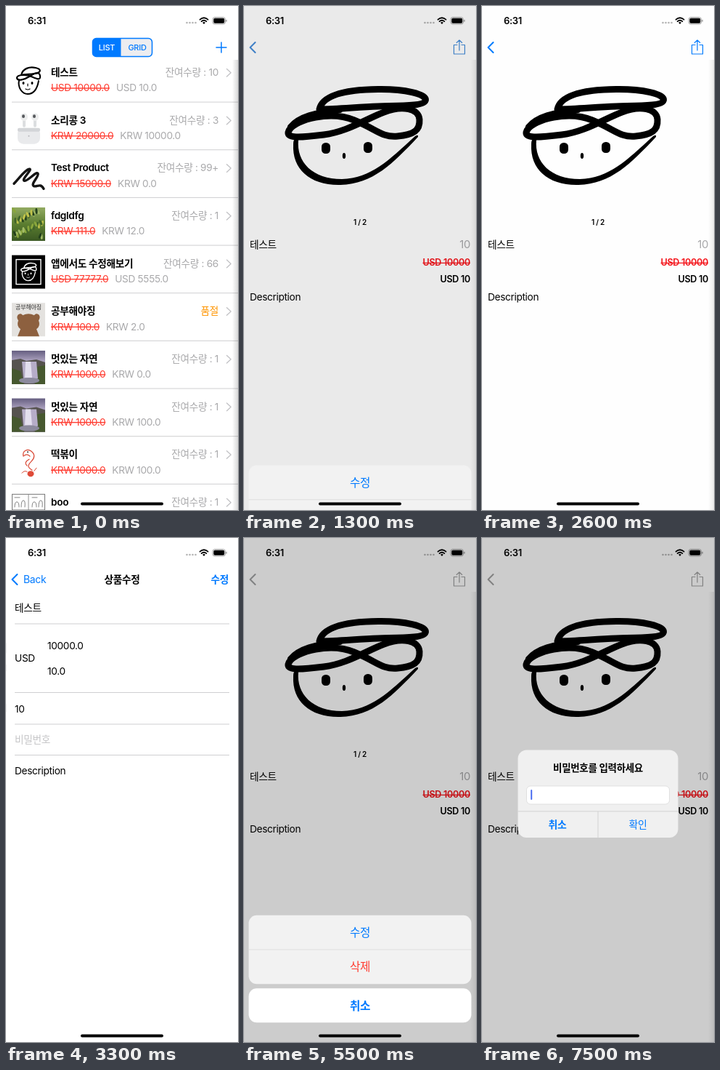
An HTML page for the animation above (8000 ms loop, 320 by 693 pixels).

```html
<!DOCTYPE html>
<html lang="ko">
<head>
<meta charset="utf-8">
<title>Shop app</title>
<style>
  html, body { margin: 0; width: 100%; height: 100%; overflow: hidden; background: #fff; }
  svg { display: block; }
  text { font-family: Inter, 'Noto Sans CJK KR', 'Noto Sans CJK', sans-serif; letter-spacing: -.025em; }
  .line { fill: none; stroke: currentColor; stroke-linecap: round; stroke-linejoin: round; }
</style>
</head>
<body>
<svg id="stage" width="320" height="693" viewBox="0 0 320 693"></svg>
<script>
const BLUE = '#007aff', RED = '#ff3b30', GRAY = '#a9a9ab', RULE = '#cfcfd1';

const text = (x, y, str, { size = 13.7, weight = 400, fill = '#000', anchor = 'start', extra = '' } = {}) =>
  `<text x="${x}" y="${y}" font-size="${size}" font-weight="${weight}" fill="${fill}" text-anchor="${anchor}" ${extra}>${str}</text>`;
const rect = (x, y, w, h, fill, rx = 0, extra = '') =>
  `<rect x="${x}" y="${y}" width="${w}" height="${h}" fill="${fill}" rx="${rx}" ${extra}/>`;
const oval = (cx, cy, rx, ry, fill) => `<ellipse cx="${cx}" cy="${cy}" rx="${rx}" ry="${ry}" fill="${fill}"/>`;
const line = (d, width, color = 'currentColor') =>
  `<path class="line" d="${d}" stroke-width="${width}" style="stroke:${color}"/>`;
const shape = (d, fill) => `<path d="${d}" fill="${fill}"/>`;
const group = (id, body, extra = '') => `<g id="${id}" ${extra}>${body}</g>`;
const gradient = (id, stops, vertical = 1) =>
  `<linearGradient id="${id}" x2="${1 - vertical}" y2="${vertical}">${stops.map(([at, color, alpha = 1]) =>
    `<stop offset="${at}" stop-color="${color}" stop-opacity="${alpha}"/>`).join('')}</linearGradient>`;

// Thumbnails, each in a 46 x 46 box
const face = color => `<g color="${color}">` +
  line('M13 15C15 6 24 3 33 5S40 12 31 13S17 14 13 15', 2.2) +
  line('M7 19C7 14 20 14 27 17S40 23 39 16S30 13 24 17S8 24 7 19', 2.2) +
  line('M10 22C8 32 14 41 22 41S35 34 37 23', 2) +
  oval(16, 26, 1.5, 1.9, color) + oval(28, 26, 1.5, 1.9, color) + line('M22 27v3M19 34q3 2 6 0', 1.2) + '</g>';

const earbuds =
  rect(8, 22, 31, 22, '#e9eaec', 8) + rect(8, 22, 31, 5, '#d3d5d8', 2) + oval(23.5, 33, 1, 1, '#b5b7ba') +
  [13, 28].map(x => rect(x + 2, 6, 4, 15, '#dcdee0', 2) + oval(x + 4, 7, 5, 5.5, '#eceded') +
    oval(x + 3, 6, 2, 2.4, '#55585c')).join('');

let leaves = rect(0, 0, 46, 46, 'url(#leafy)');
for (let i = 0; i < 34; i++) {
  const x = 3 + i * 17 % 40, y = 4 + i * 29 % 37;
  leaves += `<g transform="rotate(${i * 47 % 70 - 35} ${x} ${y})">` +
    oval(x, y, 1.6, 4, ['#89a63c', '#40642a', '#bfc24a', '#23401c', '#a4bd68'][i % 5]) + '</g>';
}

const waterfall = rect(0, 0, 46, 46, 'url(#dusk)') +
  shape('M0 13L12 11L20 14L34 12L46 16V46H0Z', '#56534f') +
  shape('M0 24L12 28L17 46H0ZM34 22L46 20V46H32Z', '#46582f') +
  shape('M14 15H34L36 38Q25 44 16 38Z', '#b6adc8') + shape('M19 15H26L28 37H18Z', '#e3dfee') +
  oval(24, 41, 14, 4, '#8c8a9d');

const bear = rect(0, 0, 46, 46, '#e4e2df') +
  text(23, 9, '공부해야징', { size: 8, anchor: 'middle', fill: '#333' }) +
  shape('M9 24C4 17 12 12 15 17Q23 13 31 17C34 12 42 17 37 24Q40 32 34 36L38 46H8L12 36Q6 32 9 24Z', '#8d603f');

const redDoodle = `<g color="#d8432f">` +
  line('M16 14C14 6 22 3 27 7S32 16 27 21S21 29 28 33M17 13Q22 10 25 14M24 18Q16 22 21 27', 1.2) +
  oval(26, 38, 4.5, 4, '#df4a38') + oval(22, 8, 1, 1, '#333') + line('M14 37q3-4 7-2M31 34l3-4', 1) + '</g>';

const comic = rect(.5, .5, 45, 45, '#fff', 0, 'stroke="#777"') + line('M23 1V45M1 22H45', .8, '#777') +
  [4, 28].map(x => line(`M${x} 18q0-7 3-7t3 7M${x + 9} 18q0-9 3-9t2 9M${x} 5h7`, .8, '#666')).join('');

const squiggle = line('M3 33C10 26 18 14 24 13S13 27 17 29S34 15 36 19S26 33 30 36S39 31 44 40', 3.4, '#151515');
const framedFace = rect(0, 0, 46, 46, '#000') + rect(6, 6, 34, 34, 'none', 0, 'stroke="#fff" stroke-width="1.4"') +
  `<g transform="translate(8 8) scale(.66)">${face('#fff')}</g>`;

const products = [
  ['테스트', 'USD 10000.0', 'USD 10.0', '10', face('#000')],
  ['소리콩 3', 'KRW 20000.0', 'KRW 10000.0', '3', earbuds],
  ['Test Product', 'KRW 15000.0', 'KRW 0.0', '99+', squiggle],
  ['fdgldfg', 'KRW 111.0', 'KRW 12.0', '1', leaves],
  ['앱에서도 수정해보기', 'USD 77777.0', 'USD 5555.0', '66', framedFace],
  ['공부해야징', 'KRW 100.0', 'KRW 2.0', '', bear],
  ['멋있는 자연', 'KRW 1000.0', 'KRW 0.0', '1', waterfall],
  ['멋있는 자연', 'KRW 1000.0', 'KRW 100.0', '1', waterfall],
  ['떡볶이', 'KRW 1000.0', 'KRW 100.0', '1', redDoodle],
  ['boo', 'KRW 1000.0', 'KRW 100.0', '1', comic],
];

const productRow = ([name, oldPrice, price, stock, thumb], i) =>
  `<g transform="translate(0 ${i * 65.65})"><g transform="translate(8 80)">${thumb}</g>` +
  text(62, 96, name, { weight: 600 }) +
  text(62, 117.4, `<tspan fill="${RED}" text-decoration="line-through">${oldPrice}</tspan><tspan dx="9">${price}</tspan>`, { fill: GRAY }) +
  text(293, 96, stock ? `잔여수량 : ${stock}` : '품절', { anchor: 'end', fill: stock ? GRAY : '#ff9500' }) +
  line('M304.5 86.5l5.7 5.3-5.7 5.3', 1.3, '#c2c2c5') + rect(8, 131.6, 312, 1, RULE) + '</g>';

const page = rect(-8, 0, 8, 693, 'url(#edge)') + rect(0, 0, 320, 693, '#fff');

const doodle =
  line('M104 142C108 124 135 115 185 114.500C222 114 251 121 250.500 129C250 138 215 137 185 138S130 142 104 142', 9) +
  line('M62 171C72 155 120 144 152 157S190 181 212 179S243 171 242 156S219 136 193 146S142 173 110 177S56 183 62 171', 9) +
  line('M64 166C76 152 98 146 132 143', 8) +
  shape('M75 184Q68 180 68 190C66 225 92 247 133 246C178 245 206 216 240 180Q241 176 236 179C200 212 175 237 135 238C95 238 72 215 75 184Z', '#000') +
  rect(107, 188, 12, 15, '#000', 5.5) + rect(165, 187, 12, 15, '#000', 5.5) + oval(138, 206, 2.2, 4, '#000');

const detail = page + doodle +
  text(160, 300.6, '1 / 2', { size: 10, weight: 600, anchor: 'middle' }) +
  text(8, 332.6, '테스트', { weight: 500 }) +
  text(312, 333.2, '10', { size: 15, anchor: 'end', fill: GRAY }) +
  text(312, 357.4, 'USD 10000', { size: 12.6, weight: 600, anchor: 'end', fill: '#f5141a', extra: 'text-decoration="line-through"' }) +
  text(312, 380.4, 'USD 10', { size: 12.6, weight: 600, anchor: 'end' }) +
  text(8, 404.6, 'Description');

const editor = page +
  [[12, 101, '테스트'], [12, 170.3, 'USD'], [57, 153, '10000.0'], [57, 188, '10.0'], [12, 239.800, '10'], [12, 325, 'Description']]
    .map(([x, y, str]) => text(x, y, str)).join('') +
  text(12, 282.2, '비밀번호', { fill: '#c5c5c7' }) +
  [117.500, 212, 255.5, 298].map(y => rect(12, y, 296, 1, RULE)).join('');

const segments =
  rect(119.5, 44.5, 82, 25, '#ededf0', 5) + shape('M158.500 44.5H124.500a5 5 0 0 0-5 5V64.5a5 5 0 0 0 5 5H158.500Z', BLUE) +
  rect(119.5, 44.5, 82, 25, 'none', 5, `stroke="${BLUE}" stroke-width="1.5"`) +
  text(139, 61, 'LIST', { size: 11, weight: 500, anchor: 'middle', fill: '#fff' }) +
  text(181, 61, 'GRID', { size: 11, weight: 500, anchor: 'middle', fill: BLUE });

const nav = rect(0, 0, 320, 74, '#fff') +
  group('listNav', segments) + group('plus', line('M290 57h14M297 50v14', 1.5), `color="${BLUE}"`) +
  group('tint',
    group('chevron', line('M15.500 50l-7 7 7 7', 2)) +
    group('share', line('M294 53.500h-4.500v12.500h15v-12.500h-4.500M297 61v-14M293.300 50.500l3.700-3.700 3.700 3.700', 1.2))) +
  group('backLabel', text(24, 62, 'Back', { size: 14, fill: BLUE })) +
  group('editTitle', text(160, 61.8, '상품수정', { weight: 600, anchor: 'middle' })) +
  group('editDone', text(307, 61.8, '수정', { weight: 600, anchor: 'end', fill: BLUE }));

const status =
  text(30, 24.8, '6:31', { size: 13, weight: 600 }) +
  [249.500, 253.500, 257.500, 261.500].map(x => oval(x, 23, 1.3, 1.3, '#b4b4b4')).join('') +
  line('M267.500 18.700q5.500-5 11 0M269.600 21.200q3.400-3 6.800 0', 1.8) + shape('M271 22.800q2-1.500 4 0l-2 2.200Z', '#000') +
  rect(285, 15.5, 17.500, 9.5, 'none', 3, 'stroke="#999" stroke-width=".9"') + rect(286.3, 16.8, 15, 7, '#000', 1.8) +
  rect(303.4, 18.7, 1.2, 3.2, '#999', .6);

const sheetText = (y, str, fill, weight = 400) => text(160, y, str, { size: 15.7, weight, fill, anchor: 'middle' });
const sheet =
  rect(6.5, 517.500, 307, 94.5, '#f2f2f2', 11) +
  group('pressEdit', shape('M6.5 564.5V528.500a11 11 0 0 1 11-11H302.500a11 11 0 0 1 11 11V564.5Z', '#dcdddd')) +
  group('pressDelete', shape('M6.5 565V601a11 11 0 0 0 11 11H302.500a11 11 0 0 0 11-11V565Z', '#dcdddd')) +
  rect(6.5, 564.5, 307, .6, '#cfcfcf') + rect(6.5, 618, 307, 47, '#fff', 11) +
  sheetText(547, '수정', BLUE) + sheetText(594, '삭제', RED) + sheetText(647.5, '취소', BLUE, 600);

const alertBox =
  rect(49.5, 291.500, 221, 120.5, '#f0f0f0', 12) +
  text(160, 321, '비밀번호를 입력하세요', { size: 13.5, weight: 600, anchor: 'middle' }) +
  rect(61.500, 341, 197, 25, '#fff', 5.5, 'stroke="#dadada" stroke-width=".8"') +
  rect(49.5, 375.500, 221, .8, '#cbcbcb') + rect(159.600, 376, .8, 36, '#cbcbcb') +
  text(104, 399.300, '취소', { size: 13.9, weight: 600, anchor: 'middle', fill: BLUE }) +
  text(215, 399.300, '확인', { size: 13.9, anchor: 'middle', fill: BLUE }) +
  group('cursor', rect(67.2, 346, 2, 14, '#4a6df0', 1));

document.getElementById('stage').innerHTML = '<defs>' +
  gradient('edge', [[0, '#000', 0], [1, '#000', .08]], 0) +
  gradient('leafy', [[0, '#93ab62'], [.5, '#5b7d30'], [1, '#3a5822']]) +
  gradient('dusk', [[0, '#655e80'], [.3, '#aaa0bd'], [1, '#59606a']]) + '</defs>' +
  group('list', products.map(productRow).join('')) + group('detail', detail) + group('editor', editor) +
  nav + status + rect(0, 0, 320, 693, '#000', 0, 'id="dim"') +
  group('sheet', sheet) + group('alertBox', alertBox) + rect(103, 682.5, 114, 4, '#000', 2);

const el = {};
document.querySelectorAll('[id]').forEach(node => el[node.id] = node);

const clamp = v => Math.min(1, Math.max(0, v));
// Critically damped spring running from 0 to 1
const spring = (t, start, rate) => {
  const u = Math.max(0, t - start) * rate / 1000;
  return 1 - (1 + u) * Math.exp(-u);
};
const within = (t, from, to) => t >= from && t < to;
const move = (node, x, y = 0) => node.setAttribute('transform', `translate(${x} ${y})`);
const fade = (node, alpha) => node.setAttribute('opacity', clamp(alpha));

function draw(t) {
  const opened = spring(t, 460, 21);
  const editing = spring(t, 2750, 21) - spring(t, 4260, 21);
  const sheetUp = spring(t, 1230, 20) - spring(t, 2340, 24) + spring(t, 5140, 20) - spring(t, 5920, 24);
  const alertIn = spring(t, 6465, 14);
  const dimmed = clamp(sheetUp + alertIn);

  move(el.list, -96 * opened);
  move(el.detail, 320 * (1 - opened) - 96 * editing);
  move(el.editor, 320 * (1 - editing));

  move(el.listNav, -90 * opened);
  fade(el.listNav, 1 - opened * 1.3);
  fade(el.plus, 1 - opened * 1.3);
  fade(el.chevron, opened);
  const sharePressed = within(t, 1030, 1230) || within(t, 4960, 5150);
  fade(el.share, opened * (1 - editing) * (sharePressed ? .2 : 1));
  const tint = [0, 122, 255].map(c => Math.round(c + (160 - c) * dimmed));
  el.tint.style.color = `rgb(${tint})`;
  move(el.backLabel, 60 * (1 - editing));
  move(el.editTitle, 110 * (1 - editing));
  for (const node of [el.backLabel, el.editTitle, el.editDone]) fade(node, editing);

  fade(el.dim, .2 * dimmed);
  move(el.sheet, 0, 195 * (1 - sheetUp));
  fade(el.pressEdit, within(t, 2290, 2800) ? 1 : 0);
  fade(el.pressDelete, within(t, 5890, 6400) ? 1 : 0);

  const scale = 1 + .2 * (1 - alertIn);
  el.alertBox.setAttribute('transform', `translate(160 352) scale(${scale}) translate(-160 -352)`);
  fade(el.alertBox, alertIn);
  fade(el.cursor, t < 6950 ? 1 : (t - 7350) / 100);
}

function tick() {
  draw(performance.now() % 8000);
  requestAnimationFrame(tick);
}
tick();
</script>
</body>
</html>
```
